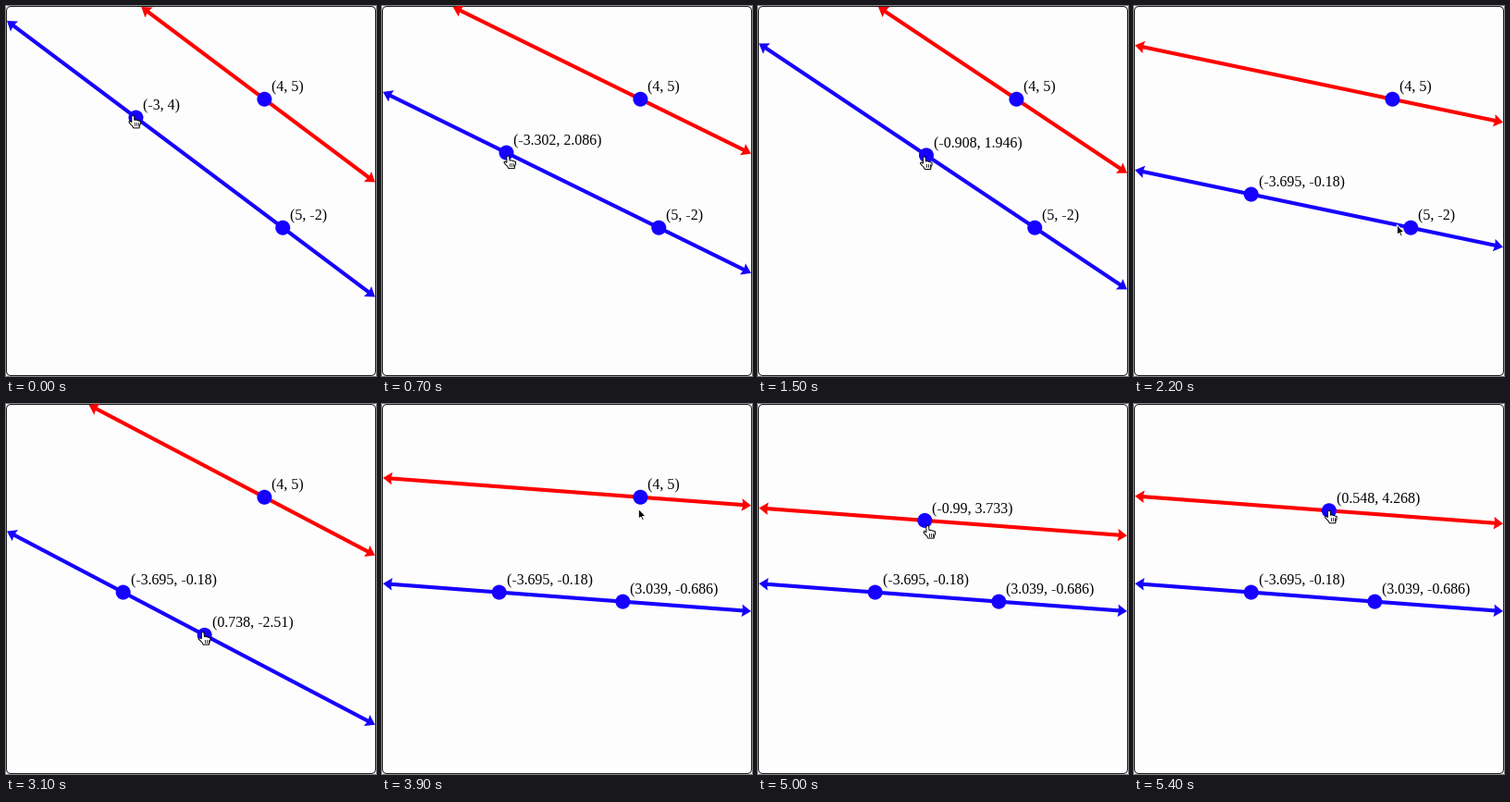
Recreate the animation shown at these times as a matplotlib script. Size 400 by 400 pixels, loop 5500 ms.

```python
import numpy as np
import matplotlib.pyplot as plt
from matplotlib.animation import FuncAnimation
from matplotlib.patches import Circle, FancyBboxPatch, Polygon

SIZE, DPI = 400, 100
FRAMES, INTERVAL = 55, 100
UNIT, CENTER = 19.85, np.array([200.0, 200.0])
LOW, HIGH = 1.0, 399.0
BLUE, RED = "#1600ff", "#ff0000"


def px(width):
    return width * 72 / DPI


def to_screen(p):
    return CENTER + UNIT * np.array([p[0], -p[1]])


def smooth(u):
    return u * u * (3 - 2 * u)


class Drag:
    """Eased moves between stops, each with a sine swing to the side."""

    def __init__(self, start_time, start, *moves):
        self.start, self.end = start_time, moves[-1][0]
        self.origin, self.moves = np.array(start, float), moves

    def at(self, t):
        t0, p0 = self.start, self.origin
        for t1, stop, swing, half_waves in self.moves:
            p1 = np.array(stop)
            if t < t1:
                u = max(0, (t - t0) / (t1 - t0))
                wave = np.sin(np.pi * half_waves * u)
                return p0 + (p1 - p0) * smooth(u) + np.array(swing) * wave
            t0, p0 = t1, p1
        return p0

    def pointer(self, t):
        """The cursor runs ahead of the point, more so when it is fast."""
        now = to_screen(self.at(t))
        drift = to_screen(self.at(t + 0.5)) - now
        return now + drift / (1 + np.hypot(*drift) / 8)


# Moves: end time, stop, swing, half waves (times in frames, graph units)
DRAGS = [
    Drag(0, (-3, 4),
         (7, (-3.302, 2.086), (-1.4, 1.1), 1),
         (15, (-0.908, 1.946), (0.8, -1.8), 1),
         (18.4, (-3.695, -0.18), (0, 0), 1)),
    Drag(23.5, (5, -2),
         (31, (0.738, -2.51), (1.2, -3.7), 1),
         (36, (3.039, -0.686), (-0.8, 0.8), 1)),
    Drag(40.5, (4, 5),
         (46, (-2.529, 3.197), (0, -3.5), 1),
         (54, (0.548, 4.268), (-1.2, 4), 2)),
]


def cursor_at(t):
    """Cursor tip on screen and whether it is a hand."""
    for drag, following in zip(DRAGS, DRAGS[1:] + [None]):
        if following is None or t <= drag.end:
            return drag.pointer(t), True
        if t < following.start:
            u = (t - drag.end) / (following.start - drag.end)
            a, b = to_screen(drag.at(t)), to_screen(following.at(t))
            return b + (a - b) * (1 - u) ** 2, False


def hand_outline():
    """Pointing hand: index finger, three knuckles, wrist and thumb."""
    finger = [(-1.4, 1), (-0.7, 0), (0.7, 0), (1.4, 1), (1.7, 5)]
    knuckles = [(2.9 + 2.1 * i + dx, 4.6 + 0.7 * i + dy)
                for i in range(3) for dx, dy in ((0, 0), (1.2, 0.3))]
    palm = [(8.2, 9), (7, 11.5), (7, 13.5), (0.5, 13.5), (-0.6, 11.4)]
    thumb = [(-4, 7.8), (-4.3, 6.5), (-3.2, 5.9), (-1.4, 7.2)]
    return np.array(finger + knuckles + palm + thumb)


HAND = hand_outline()
POINTER = np.array([
    (0, 0), (0, 11), (2.5, 8.8), (4.3, 12.6), (6, 12), (4.3, 8.2), (7.8, 8)])


def number(v):
    return f"{round(v, 3) + 0.0:.3f}".rstrip("0").rstrip(".")


class ArrowLine:
    def __init__(self, ax, color):
        self.body, = ax.plot([], [], color=color, lw=px(4.1),
                             solid_capstyle="butt", zorder=2)
        self.heads = [ax.add_patch(Polygon(np.zeros((4, 2)), fc=color, lw=0,
                                           zorder=2)) for _ in range(2)]

    def place(self, p, d):
        """Fit the line through p along d to the stage."""
        d = d / np.hypot(*d)
        safe = np.where(np.abs(d) < 1e-9, 1e-9, d)
        reach = np.sort([(LOW - p) / safe, (HIGH - p) / safe], axis=0)
        ends = p + d * reach[0].max(), p + d * reach[1].min()
        side = np.array([-d[1], d[0]])
        for head, tip, back in zip(self.heads, ends, (d, -d)):
            base = tip + back * 10
            head.set_xy([tip, base + side * 6.8, tip + back * 8.8,
                         base - side * 6.8])
        a, b = ends[0] + d * 8, ends[1] - d * 8
        self.body.set_data([a[0], b[0]], [a[1], b[1]])


class Point:
    def __init__(self, ax):
        self.dot = ax.add_patch(Circle((0, 0), 8, fc=BLUE, lw=0, zorder=3))
        self.label = ax.text(0, 0, "", family="Liberation Serif",
                             size=px(16), color="black", zorder=4)

    def place(self, p):
        x, y = to_screen(p)
        self.dot.center = x, y
        self.label.set_position((x + 8, y - 8))
        self.label.set_text(f"({number(p[0])}, {number(p[1])})")


fig = plt.figure(figsize=(SIZE / DPI, SIZE / DPI), dpi=DPI, facecolor="white")
ax = fig.add_axes([0, 0, 1, 1])
ax.set_xlim(0, SIZE)
ax.set_ylim(SIZE, 0)
ax.axis("off")
ax.add_patch(FancyBboxPatch(
    (0.5, 0.5), SIZE - 1, SIZE - 1, fc="#fdfdfd", ec="#222222",
    lw=px(1), boxstyle="round,pad=0,rounding_size=5", zorder=1))

red_line, blue_line = ArrowLine(ax, RED), ArrowLine(ax, BLUE)
points = [Point(ax) for _ in DRAGS]
hand = ax.add_patch(Polygon(HAND, fc="white", ec="black", lw=px(1), zorder=6))
creases = [ax.plot([], [], color="black", lw=px(0.8), zorder=7)[0]
           for _ in range(3)]
arrow = ax.add_patch(Polygon(POINTER, fc="black", ec="white", lw=px(1),
                             zorder=6))


def update(t):
    spots = [drag.at(t) for drag in DRAGS]
    for point, spot in zip(points, spots):
        point.place(spot)
    a, b, c = map(to_screen, spots)
    blue_line.place(a, b - a)
    red_line.place(c, b - a)

    tip, is_hand = cursor_at(t)
    hand.set_xy(HAND + tip)
    arrow.set_xy(POINTER + tip)
    hand.set_visible(is_hand)
    arrow.set_visible(not is_hand)
    for i, crease in enumerate(creases):
        x = tip[0] + 1.8 + 2 * i
        crease.set_data([x, x], [tip[1] + 8, tip[1] + 11])
        crease.set_visible(is_hand)
    return []


anim = FuncAnimation(fig, update, frames=FRAMES, interval=INTERVAL,
                     init_func=lambda: update(0), repeat=True, repeat_delay=0)
plt.show()
```
